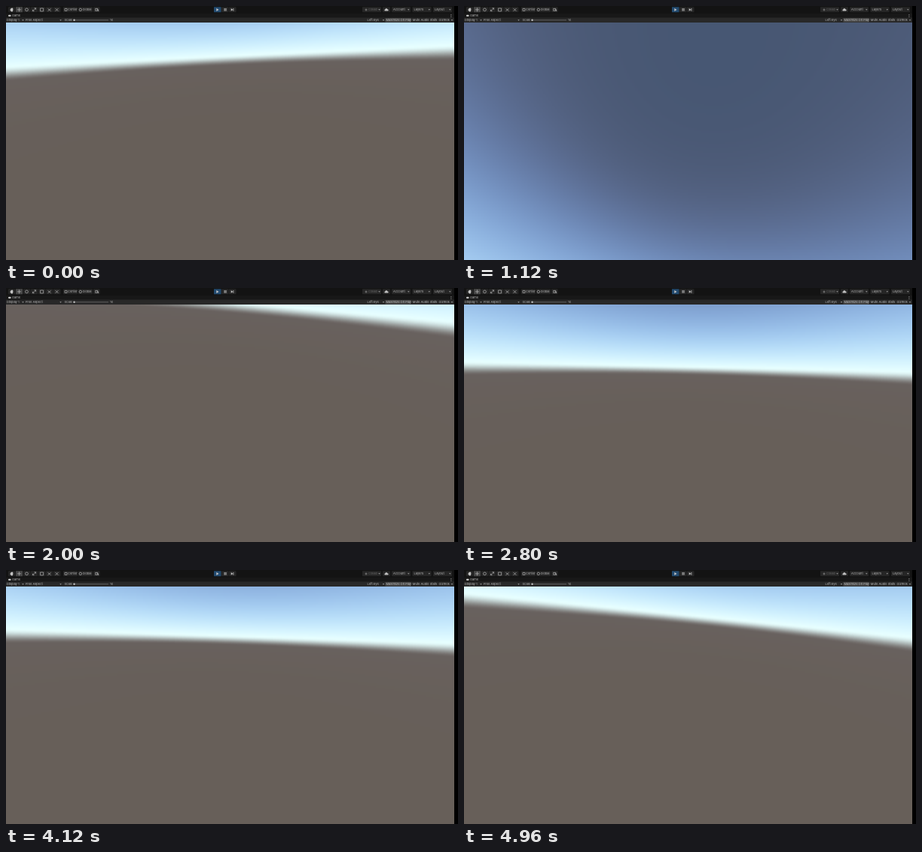
Write an HTML page with a canvas that moves like this. It is 600 px wide and 338 px high and loops after 5 s.

```html
<!DOCTYPE html>
<html lang="en">
<head>
<meta charset="utf-8">
<title>Game view</title>
<style>
  html, body { margin: 0; width: 100%; height: 100%; overflow: hidden; background: #000; }
  canvas { position: absolute; left: 0; top: 22px; width: 596px; height: 316px; }
  svg { position: absolute; left: 0; top: 0; }
  text { font: 4px Inter, Roboto, sans-serif; fill: #b4b4b4; }
  .dim { fill: #666; }
</style>
</head>
<body>
<canvas id="view" width="298" height="158"></canvas>
<svg id="ui" width="600" height="338" viewBox="0 0 600 338">
  <path d="M595 0h5v338h-5z"/>
  <path fill="#131313" d="M0 0h595v10H0z"/>
  <path fill="#181818" d="M0 10h595v6H0z"/>
  <path fill="#282828" d="M0 15.5h595V22H0z"/>
  <g id="buttons" fill="#262626"></g>
  <path fill="#464646" d="M13 1.3h9v7h-9zM503.5 16h34v5.4h-34z"/>
  <path fill="#234b70" d="M276 1.3h9.5v7H276z"/>
  <g fill="none" stroke="#b4b4b4" stroke-width=".7">
    <path d="M17.5 2.4v5M15 4.9h5M35.5 6.8l4-4m-4 2v2h2m0-4h2v2M45.6 3h4v4h-4zM55.5 3.4l4 3.4m0-3.4l-4 3.4M65.5 7l4-4m-4 0l4 4"/>
    <circle cx="27.5" cy="4.9" r="1.9"/>
    <path d="M78 3.4h3v3h-3zM118.7 3.4h3v3h-3zm1.5 1.5h2.4v2.2"/>
    <circle cx="98.8" cy="4.9" r="1.7"/>
    <path stroke="#777" d="M90 18.8h46"/>
  </g>
  <g fill="#c4c4c4">
    <path d="M6 3.8l1-.9 1-.4 1.2.5.2 2.4-.8 2H7l-1.600-2z"/>
    <path d="M279.300 2.900v4l3.200-2zM289.600 3h1v3.800h-1zm1.900 0h1v3.800h-1zM298.700 3v3.800l2.600-1.900zm2.800 0h.8v3.800h-.8z"/>
    <path d="M503 6.600a1.200 1.200 0 0 1 .3-2.200 1.700 1.700 0 0 1 3.200 0 1.100 1.100 0 0 1 .2 2.200z"/>
    <circle cx="90.500" cy="18.800" r="1.200"/>
    <rect x="3" y="11.700" width="3.600" height="2.300" rx="1"/>
    <path d="M590.500 11h.8v.8h-.8zm0 1.500h.8v.8h-.8zm0 1.500h.8v.8h-.8z"/>
    <circle class="dim" cx="478" cy="4.900" r="1.500"/>
  </g>
</svg>
<script>
const ui = document.getElementById('ui');
const canvas = document.getElementById('view');
const ctx = canvas.getContext('2d');
const W = canvas.width, H = canvas.height;
const image = ctx.createImageData(W, H);
const pixels = new Uint32Array(image.data.buffer);
const FOCAL = 220, LOOP = 5000, STEP = 40;

function add(parent, tag, attrs, content = '') {
  const el = document.createElementNS('http://www.w3.org/2000/svg', tag);
  for (const name in attrs) el.setAttribute(name, attrs[name]);
  el.textContent = content;
  parent.appendChild(el);
}
const button = (x, width) =>
  add(document.getElementById('buttons'), 'rect', { x, y: 1.3, width, height: 7, rx: .6 });
const label = (x, y, name, style = '') => add(ui, 'text', { x, y, class: style }, name);
const arrow = (x, y) => add(ui, 'path', { d: `M${x - 1.2} ${y}h2.4l-1.2 1.5z`, fill: '#a8a8a8' });

for (let i = 0; i < 7; i++) button(3 + 10 * i, 9.4);
for (let i = 1; i < 3; i++) button(276 + 10 * i, 9.5);
button(116, 8.5);
button(500, 10);
['Center', 'Global'].forEach((name, i) => {
  button(76 + 20 * i, 19);
  label(82 + 19.5 * i, 6.3, name);
});
button(473, 25);
label(481, 6.3, 'Collab', 'dim');
arrow(495.5, 4.3);
['Account', 'Layers', 'Layout'].forEach((name, i) => {
  const x = 512 + 27.5 * i;
  button(x, 25);
  label(x + 2, 6.3, name);
  arrow(x + 22.3, 4.3);
});

label(8, 14.4, 'Game');
Object.entries({
  'Display 1': 1, 'Free Aspect': 26, 'Scale': 77.5, '1x': 138, 'Left Eye': 479.5,
  'Maximize On Play': 504.5, 'Mute Audio': 539.8, 'Stats': 562.7, 'Gizmos': 574.5
}).forEach(([name, x]) => label(x, 20.2, name));
for (const x of [22.5, 72.5, 501, 592]) arrow(x, 18.2);

// Colour seen in a direction, given the sine of its elevation
function skyColour(s) {
  const up = Math.max(0, s);
  const sky = [
    66 + 165 * Math.exp(-3.5 * up),
    86 + 169 * Math.exp(-2 * up - 3.2 * up * up),
    114 + 141 * Math.exp(-5.2 * up * up)
  ];
  const haze = Math.exp(9 * Math.min(0, s));
  const ground = [103 + 2 * haze, 95 + 3 * haze, 89 + 8 * haze];
  const k = Math.min(1, Math.max(0, 1 + s / .048));
  const light = k * k * (3 - 2 * k);
  return sky.map((c, i) => Math.round(ground[i] + (c - ground[i]) * light));
}
const LEVELS = 4000;
const palette = Uint32Array.from({ length: LEVELS + 1 }, (_, n) => {
  const [r, g, b] = skyColour(n / LEVELS * 2 - 1);
  return (255 << 24 | b << 16 | g << 8 | r) >>> 0;
});

// Head movement: time, pitch and roll in degrees
const poses = [
  [0, -27.4, -2.7], [560, -15, 2], [1120, 57, 15], [1400, 60, 13], [1680, 30, 8], [2000, -36.3, 5.1],
  [2520, -6, 3.5], [2800, -19, 1.3], [3380, -15.7, -4.8], [4120, -22.8, 1.8], [4400, 12, 4], [4960, -28.6, 5.7]
];

// Smooth curve through the poses
function pose(t, part) {
  const last = poses.length - 1;
  let i = 0;
  while (i < last - 1 && poses[i + 1][0] <= t) i++;
  const slope = n => {
    const a = poses[Math.max(0, n - 1)], b = poses[Math.min(last, n + 1)];
    return (b[part] - a[part]) / (b[0] - a[0]);
  };
  const a = poses[i], b = poses[i + 1], span = b[0] - a[0];
  const k = Math.min(1, (t - a[0]) / span), j = 1 - k;
  return a[part] * (1 + 2 * k) * j * j + b[part] * k * k * (3 - 2 * k)
    + span * (slope(i) * k * j * j - slope(i + 1) * k * k * j);
}

function render(t) {
  const pitch = pose(t, 1) * Math.PI / 180, roll = pose(t, 2) * Math.PI / 180;
  const upX = Math.sin(roll) * Math.cos(pitch), upY = Math.cos(roll) * Math.cos(pitch), upZ = Math.sin(pitch);
  for (let y = 0, n = 0; y < H; y++) {
    const v = H - 1 - 2 * y;
    for (let x = 0; x < W; x++, n++) {
      const u = 2 * x - W + 1;
      const s = (u * upX + v * upY + FOCAL * upZ) / Math.sqrt(u * u + v * v + FOCAL * FOCAL);
      pixels[n] = palette[Math.round((s + 1) / 2 * LEVELS)];
    }
  }
  ctx.putImageData(image, 0, 0);
}

let shown = -1;
function tick() {
  const t = Math.floor(performance.now() % LOOP / STEP) * STEP;
  if (t !== shown) render(shown = t);
  requestAnimationFrame(tick);
}
tick();
</script>
</body>
</html>
```
